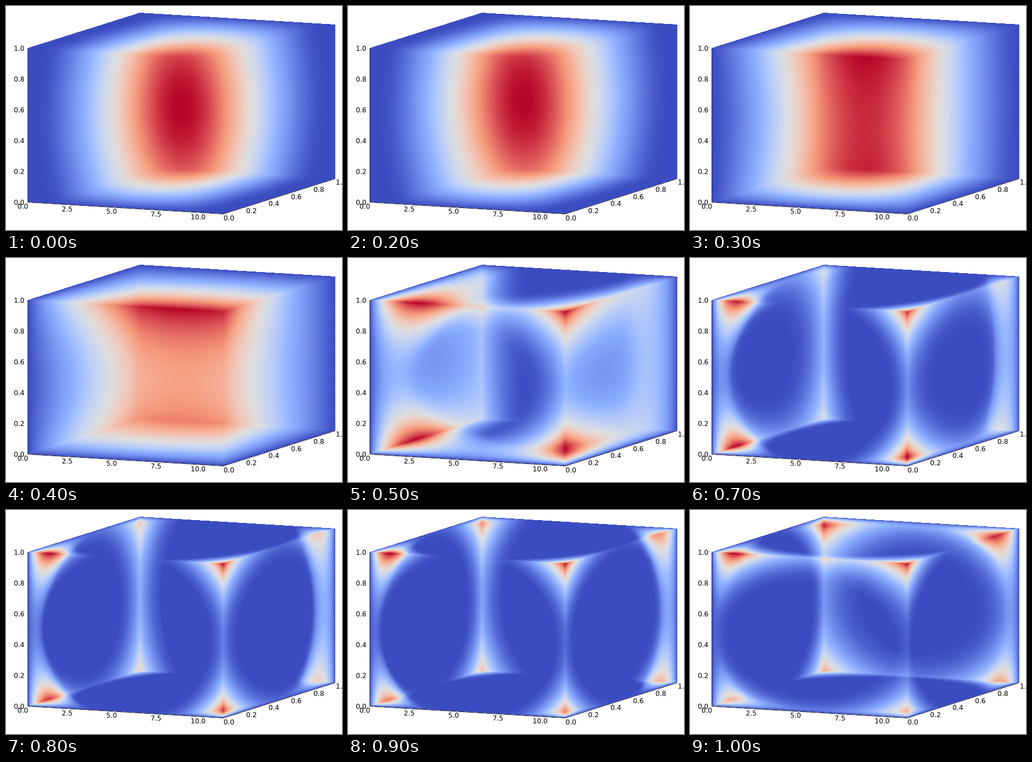
These frames come from a looping animation (600 by 400 pixels, 1.1 s). An HTML page with a canvas:

```html
<!DOCTYPE html>
<html>
<head>
<meta charset="utf-8">
<style>
html, body { margin: 0; width: 100%; height: 100%; overflow: hidden; background: #fff; }
canvas { display: block; }
</style>
</head>
<body>
<canvas id="stage" width="600" height="400"></canvas>
<script>
const W = 600, H = 400, LOOP = 1100, STEP = 100, SAMPLES = 32;
const ctx = document.getElementById('stage').getContext('2d');

const mix = (a, b, k) => a + (b - a) * k;
const ramp = (from, to, t) => Math.min(1, Math.max(0, (t - from) / (to - from)));
const smooth = (from, to, t) => {
  const k = ramp(from, to, t);
  return k * k * (3 - 2 * k);
};

// A bright core turns inside out: the middle empties and the density moves to the corners.
function shapeAt(t) {
  const rise = smooth(200, 400, t);
  const bend = smooth(220, 580, t) ** 1.4;
  const late = ramp(400, 1000, t);
  const a = mix(-3.9, 4.1, bend) - 1.7 * ramp(900, 1000, t);
  const b = mix(-0.6, 4, ramp(300, 1000, t));
  const edge = mix(-0.15, 0.52, rise) - 0.2 * late;
  return {
    a, b,
    core: edge - (a + b) / 4,
    c: mix(-0.65, 1.2, rise) + 1.4 * late * late,
    skew: rise * mix(3, 1.05, late),
    cy: 0.5 - 0.03 * rise,
    cz: 0.535 + 0.045 * ramp(100, 200, t) - 0.13 * rise
      + 0.055 * ramp(400, 500, t) - 0.035 * ramp(700, 1000, t)
  };
}

// Parallel projection: x runs (349, 21), y runs (200, -63), z runs (0, -275).
const DX = 200 / 349, DZ = (63 + 21 * DX) / 275;

// Total density along the view ray through a pixel, or -1 outside the box.
function integrate(px, py, { a, b, c, core, skew, cy, cz }) {
  const x0 = (px - 39) / 349;
  const z0 = (350 + 21 * x0 - py) / 275;
  const near = Math.max(0, (x0 - 1) / DX, (z0 - 1) / DZ);
  const far = Math.min(1, x0 / DX, z0 / DZ);
  if (far <= near) return -1;
  const ds = (far - near) / SAMPLES;
  let sum = 0;
  for (let i = 0; i < SAMPLES; i++) {
    const s = near + (i + 0.5) * ds;
    const x = x0 - DX * s - 0.5, y = s - cy, z = z0 - DZ * s - cz;
    sum += Math.max(0, core + a * x * x + b * y * y + (c - skew * (s - 0.5)) * z * z);
  }
  return sum * ds;
}

const STOPS = ['3b4cc0', '8db0fe', 'dddddd', 'f49a7b', 'b40426'].map(hex => parseInt(hex, 16));

// Blue to grey to red, lifted a little between the stops.
function channel(u, shift) {
  const n = Math.min(3, Math.floor(u * 4)), k = u * 4 - n;
  const part = i => STOPS[i] >> shift & 255;
  return mix(part(n), part(n + 1), k) + 32 * k * (1 - k);
}

function render(time) {
  const shape = shapeAt(time);
  const light = new Float32Array(W * H)
    .map((_, i) => integrate(i % W + 0.5, Math.floor(i / W) + 0.5, shape));
  const max = light.reduce((m, v) => Math.max(m, v), 0);
  const image = new ImageData(W, H);
  light.forEach((v, i) => {
    if (v < 0) image.data.fill(255, i * 4, i * 4 + 4);
    else image.data.set([16, 8, 0].map(shift => channel(v / max, shift)).concat(255), i * 4);
  });
  return image;
}

function labels(count, unit, align, x, y, dx, dy) {
  ctx.textAlign = align;
  for (let i = 0; i < count; i++) ctx.fillText((i * unit).toFixed(1), x + dx * i, y + dy * i);
}

function drawAxes() {
  ctx.strokeStyle = '#000';
  ctx.lineWidth = 0.8;
  ctx.beginPath();
  ctx.moveTo(39, 75.5);
  ctx.lineTo(39, 350.5);
  ctx.lineTo(388, 371.5);
  ctx.lineTo(588, 308.5);
  ctx.stroke();
  ctx.fillStyle = '#000';
  ctx.font = '12px "DejaVu Sans", sans-serif';
  labels(6, 0.2, 'right', 33, 354.8, 0, -55);
  labels(5, 2.5, 'right', 39.7, 361.8, 79.2, 4.8);
  labels(6, 0.2, 'left', 388.6, 382.6, 40.1, -12.7);
}

const frames = [];
for (let t = 0; t < LOOP; t += STEP) frames.push(t === STEP ? frames[0] : render(t));
const start = performance.now();
let shown = -1;

function draw() {
  const index = Math.floor((performance.now() - start) % LOOP / STEP);
  if (index !== shown) {
    shown = index;
    ctx.putImageData(frames[index], 0, 0);
    drawAxes();
  }
  requestAnimationFrame(draw);
}
draw();
</script>
</body>
</html>
```
